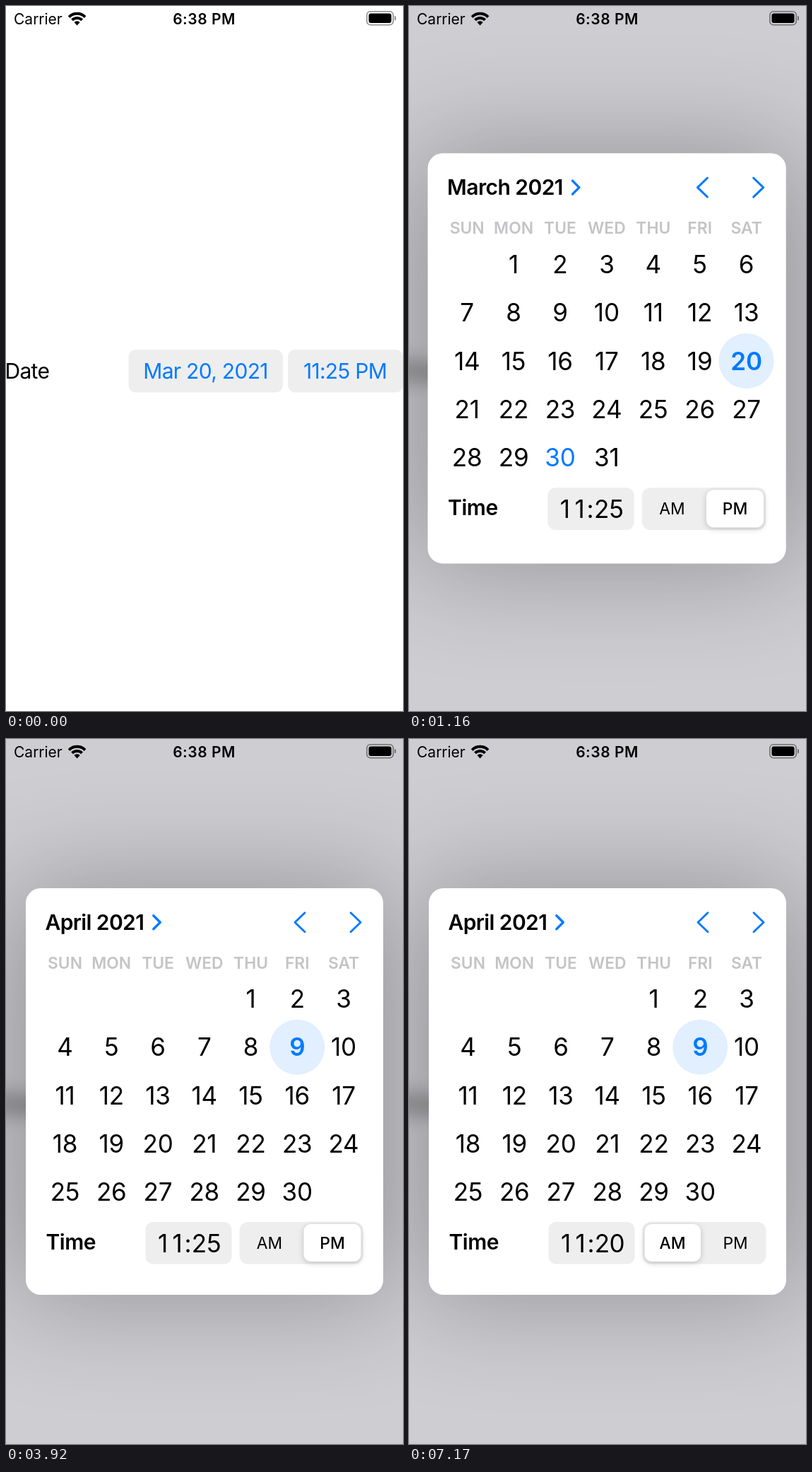
An HTML page with a canvas for the animation above (8 s loop, 562x997 px).

```html
<!DOCTYPE html>
<html lang="en">
<head>
<meta charset="utf-8">
<title>Date picker</title>
<style>
  html, body { margin: 0; width: 100%; height: 100%; overflow: hidden; background: #fff; }
  canvas { display: block; width: 562px; height: 997px; }
</style>
</head>
<body>
<canvas id="stage" width="562" height="997"></canvas>
<script>
const ctx = document.getElementById('stage').getContext('2d');
const LOOP = 8000, BLUE = '#007aff', FIELD = '#eeeeef';
const PICKER = { left: 173.5, top: 486, right: 562, bottom: 546.5 };
const CARD = { left: 28, top: 211, right: 534, bottom: 786 };
const PAGE_WIDTH = CARD.right - CARD.left;
const WEEKDAYS = ['SUN', 'MON', 'TUE', 'WED', 'THU', 'FRI', 'SAT'];
const MARCH = { name: 'March 2021', firstColumn: 1, days: 31, today: 30 };
const APRIL = { name: 'April 2021', firstColumn: 4, days: 30 };

const clamp = v => Math.min(1, Math.max(0, v));
const mix = (a, b, p) => a + (b - a) * p;
const progress = (t, start, end) => clamp((t - start) / (end - start));
const easeInOut = p => p * p * (3 - 2 * p);
const easeOut = p => 1 - (1 - p) ** 3;
const columnX = c => 83.5 + 65.75 * c;
const rowY = r => 367.3 + 68.3 * r;

// Slightly underdamped spring from 0 to 1
function spring(ms) {
  if (ms <= 0) return 0;
  const a = ms * 0.0122;
  return 1 - Math.exp(-a * 4 / 3) * (Math.cos(a) + Math.sin(a) * 4 / 3);
}

function text(str, x, baseline, size, { weight = 400, color = '#000', align = 'left', spacing = 0 } = {}) {
  ctx.font = `${weight} ${size}px Inter, Roboto, sans-serif`;
  ctx.letterSpacing = spacing + 'px';
  ctx.textAlign = align;
  ctx.fillStyle = color;
  ctx.fillText(str, x, baseline);
  return ctx.measureText(str).width;
}

function box(x, y, w, h, r, color) {
  ctx.fillStyle = color;
  ctx.beginPath();
  ctx.roundRect(x, y, w, h, r);
  ctx.fill();
}

function clipped(x, y, w, h, r, draw) {
  ctx.save();
  ctx.beginPath();
  ctx.roundRect(x, y, w, h, r);
  ctx.clip();
  draw();
  ctx.restore();
}

function chevron(x, y, dx, dy, width, color = BLUE) {
  ctx.strokeStyle = color;
  ctx.lineWidth = width;
  ctx.lineCap = ctx.lineJoin = 'round';
  ctx.beginPath();
  ctx.moveTo(x, y - dy);
  ctx.lineTo(x + dx, y);
  ctx.lineTo(x, y + dy);
  ctx.stroke();
}

function statusBar() {
  text('Carrier', 11, 25.5, 21);
  text('6:38 PM', 280.5, 25.5, 21, { weight: 600, align: 'center', spacing: 0.5 });
  ctx.fillStyle = ctx.strokeStyle = '#000';
  ctx.lineWidth = 3.9;
  ctx.lineCap = 'butt';
  for (const r of [16.2, 10]) {
    ctx.beginPath();
    ctx.arc(100.6, 27, r, -Math.PI * 0.75, -Math.PI * 0.25);
    ctx.stroke();
  }
  ctx.beginPath();
  ctx.moveTo(100.6, 27.5);
  ctx.arc(100.6, 27, 5.8, -Math.PI * 0.75, -Math.PI * 0.25);
  ctx.fill();

  box(513.5, 10.5, 32, 13.5, 3, '#000');
  ctx.strokeStyle = 'rgba(0,0,0,.45)';
  ctx.lineWidth = 1.6;
  ctx.beginPath();
  ctx.roundRect(510.8, 7.8, 37.4, 18.9, 5);
  ctx.stroke();
  box(550, 14, 2, 6.5, [0, 2, 2, 0], 'rgba(0,0,0,.45)');
}

function dateLabel(p) {
  const draw = () => text('Date', -1.5, 527, 30, { spacing: -0.7 });
  ctx.save();
  if (p > 0.01) ctx.filter = `blur(${14 * p}px)`;
  draw();
  if (p > 0.01) {
    // The blur repeats the picture beyond the left edge
    ctx.scale(-1, 1);
    draw();
  }
  ctx.restore();
}

function pills() {
  box(173.5, 486, 218.5, 60.5, 10, FIELD);
  box(399, 486, 163, 60.5, 10, FIELD);
  const style = { color: BLUE, align: 'center', spacing: -0.7 };
  text('Mar 20, 2021', 282.5, 527, 30, style);
  text('11:25 PM', 480, 527, 30, style);
}

function monthGrid(month, selected) {
  for (let day = 1; day <= month.days; day++) {
    const cell = month.firstColumn + day - 1;
    const x = columnX(cell % 7), y = rowY(Math.floor(cell / 7));
    const isSelected = day === selected;
    if (isSelected) {
      ctx.fillStyle = '#e1efff';
      ctx.beginPath();
      ctx.arc(x, y + 0.2, 39, 0, Math.PI * 2);
      ctx.fill();
    }
    text(day, x, y + 12.7, 35, {
      weight: isSelected ? 600 : 400,
      color: isSelected || day === month.today ? BLUE : '#000',
      align: 'center',
      spacing: -0.2
    });
  }
}

function timeField(t) {
  const roll = 52 * easeInOut(progress(t, 6480, 7170));
  const digits = (str, centers, y) =>
    [...str].forEach((ch, i) => text(ch, centers[i], y, 35, { align: 'center' }));
  box(197.5, 683, 122, 59.5, 11, FIELD);
  clipped(197.5, 683, 122, 59.5, 11, () => {
    digits('11:', [222, 242.5, 257.5], 725.5);
    digits('25', [273.5, 294.5], 725.5 + roll);
    digits('20', [273.5, 294.5], 673.5 + roll);
  });
}

function meridiem(t) {
  const p = easeOut(progress(t, 5260, 5700));
  box(330.5, 683, 175, 59.5, 12, FIELD);
  ctx.save();
  ctx.shadowColor = 'rgba(0,0,0,.2)';
  ctx.shadowBlur = 8;
  ctx.shadowOffsetY = 2;
  box(mix(421.5, 333.5, p), 686, mix(81, 79.5, p), 53, 10, '#fff');
  ctx.restore();
  text('AM', 373, 721, 22.8, { weight: p > 0.5 ? 500 : 400, align: 'center' });
  text('PM', 462, 721, 22.8, { weight: p > 0.5 ? 400 : 500, align: 'center' });
}

function calendar(t) {
  const month = t < 2510 ? MARCH : APRIL;
  const titleWidth = text(month.name, 55.5, 269.5, 30, { weight: 600, spacing: -0.6 });
  chevron(55.5 + titleWidth + 13.5, 259.3, 9.5, 9.5, 3.4);
  chevron(423, 259.3, -14, 13.5, 2.9);
  chevron(488, 259.3, 14, 13.5, 2.9, t >= 2220 && t < 2370 ? '#0a4a96' : BLUE);

  WEEKDAYS.forEach((name, c) =>
    text(name, columnX(c), 325, 22.8, { weight: 600, color: '#c4c4c6', align: 'center' }));

  const slide = PAGE_WIDTH * easeInOut(progress(t, 2320, 2660));
  clipped(CARD.left, 330, PAGE_WIDTH, 350, 0, () => {
    ctx.translate(-slide, 0);
    if (slide < PAGE_WIDTH) monthGrid(MARCH, 20);
    ctx.translate(PAGE_WIDTH, 0);
    if (slide > 0) monthGrid(APRIL, t >= 3920 ? 9 : 0);
  });

  text('Time', 56.5, 721.5, 30, { weight: 600, spacing: -0.5 });
  timeField(t);
  meridiem(t);
}

function popover(t, p) {
  const edge = side => mix(PICKER[side], CARD[side], p);
  const x = edge('left'), y = edge('top');
  const w = edge('right') - x, h = edge('bottom') - y;
  const radius = 10 + 11 * p;
  const layer = (origin, alpha, draw) => {
    const scale = w / (origin.right - origin.left);
    ctx.save();
    ctx.globalAlpha = clamp(alpha);
    ctx.translate(x, y);
    ctx.scale(scale, scale);
    ctx.translate(-origin.left, -origin.top);
    draw();
    ctx.restore();
  };

  // Only the soft shadow: its caster lies off stage
  ctx.save();
  ctx.shadowColor = `rgba(0,0,0,${0.3 * clamp(p * 5)})`;
  ctx.shadowBlur = 160;
  ctx.shadowOffsetX = 3000;
  const spread = 18 * p;
  box(x - spread - 3000, y, w + 2 * spread, h, radius, '#000');
  ctx.restore();

  ctx.globalAlpha = clamp(p * 4);
  box(x, y, w, h, radius, '#fff');
  ctx.globalAlpha = 1;
  clipped(x, y, w, h, radius, () => {
    if (p < 0.67) layer(PICKER, 1 - p * 1.5, pills);
    layer(CARD, p * 2, () => calendar(t));
  });
}

function render(t) {
  const p = spring(t - 937), dim = clamp(p);
  ctx.fillStyle = `rgb(${mix(255, 206, dim)},${mix(255, 205, dim)},${mix(255, 210, dim)})`;
  ctx.fillRect(0, 0, 562, 997);
  dateLabel(dim);
  if (p > 0) popover(t, p);
  else pills();
  statusBar();
}

const start = performance.now();
function tick() {
  render((performance.now() - start) % LOOP);
  requestAnimationFrame(tick);
}
tick();
</script>
</body>
</html>
```
